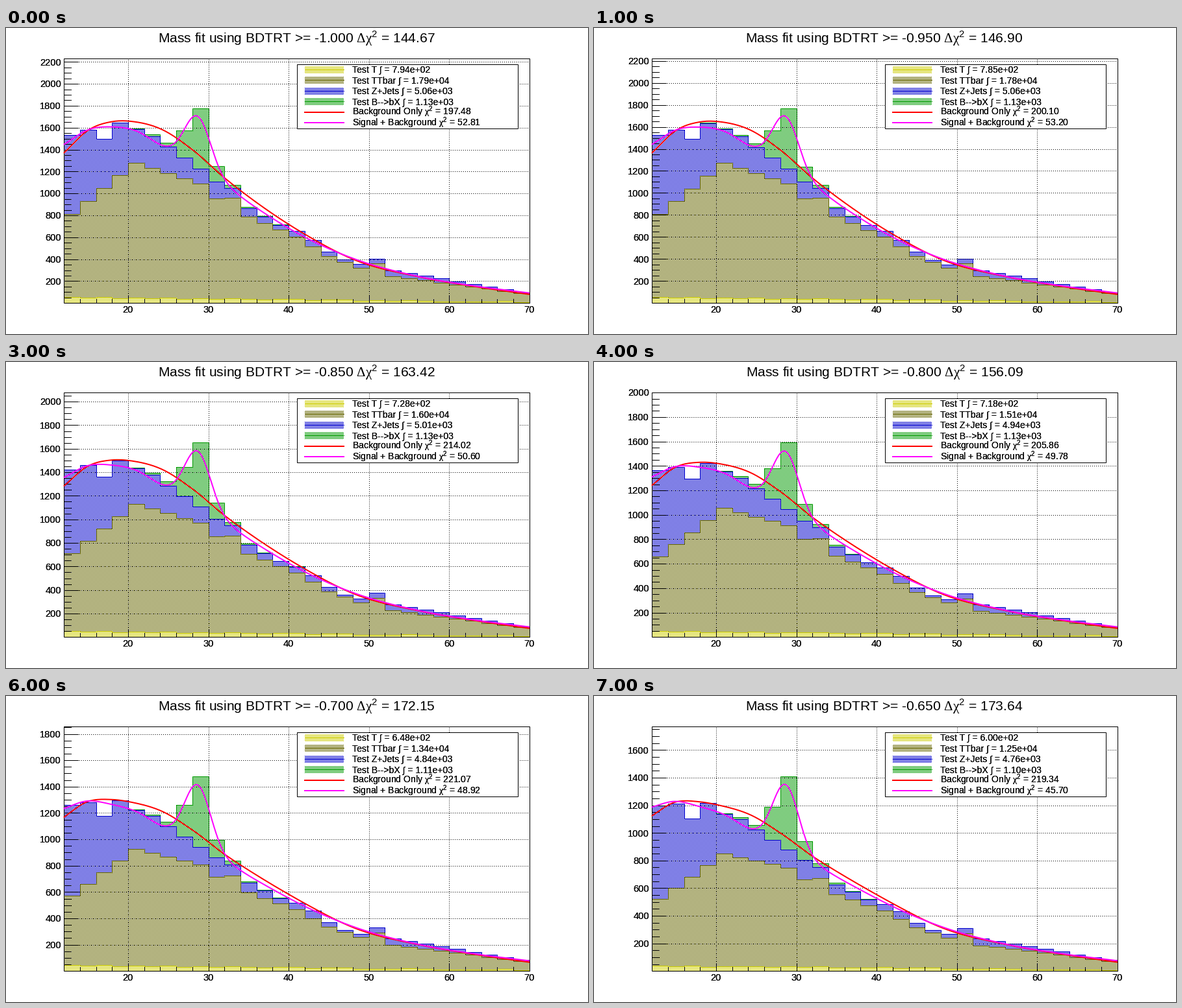
Recreate the animation shown at these times as a matplotlib script. Size 896 by 472 pixels, loop 8000 ms.

```python
import numpy as np
import matplotlib.pyplot as plt
from matplotlib.animation import FuncAnimation
from matplotlib.patches import Rectangle

W, H, DPI = 896, 472, 100
PX = 72 / DPI
LEFT, RIGHT, TOP, BASE = 0.1 * W, 0.9 * W, 0.1 * H, 0.9 * H
M_MIN, M_MAX, BIN = 12, 70, 2

plt.rcParams.update({
    "font.family": "Liberation Sans",
    "mathtext.fontset": "custom",
    "mathtext.rm": "Liberation Sans",
    "mathtext.cal": "Liberation Serif",
})
CHI2 = r"$\mathcal{\chi}^2$"
DELTA_CHI2 = r"$\mathcal{\Delta\chi}^2$"

RED, MAGENTA = (255, 0, 255)[:1] + (0, 0), (255, 0, 255)
GREEN, BLUE, OLIVE, YELLOW = (0, 153, 0), (0, 0, 204), (102, 102, 0), (204, 204, 0)

# Yields and fit quality, one entry per cut
CUTS = np.linspace(-1, -0.65, 8)
N_T = [794, 785, 756, 728, 718, 692, 648, 600]
N_TT = [17900, 17780, 17200, 16000, 15060, 14440, 13450, 12480]
N_Z = [5060, 5060, 5050, 5010, 4940, 4920, 4840, 4760]
N_SIG = [1130, 1130, 1130, 1130, 1130, 1120, 1110, 1100]
CHI_BG = [197.48, 200.10, 207.844, 214.02, 205.864, 221.954, 221.07, 219.34]
CHI_SB = [52.81, 53.20, 53.476, 50.60, 49.776, 51.606, 48.92, 45.70]

# Key points of the loosest cut: (bin, events) and (mass, events)
TT_KEYS = [(0, 814), (4, 1281), (8, 1092), (9, 956), (10, 962), (11, 790),
           (14, 607), (16, 430), (18, 324), (19, 365), (20, 247), (23, 188), (28, 90)]
Z_KEYS = [(0, 721), (1, 650), (2, 449), (3, 479), (4, 307), (5, 290), (8, 136),
          (9, 154), (10, 89), (13, 45), (15, 59), (17, 18), (20, 53), (28, 8)]
BG_KEYS = [(12, 1375), (15, 1580), (18, 1658), (21, 1654), (24, 1592), (28, 1400),
           (32, 1143), (36, 918), (42, 630), (48, 402), (56, 245), (63, 155), (70, 82)]
SB_KEYS = [(12, 1451), (15, 1584), (18, 1610), (21, 1572), (24, 1440), (28, 1276),
           (32, 1078), (36, 869), (42, 603), (48, 410), (56, 248), (63, 160), (70, 95)]
# Share of the fitted background kept by the tightest cut
KEPT_KEYS = [(12, 0.82), (18, 0.74), (26, 0.714), (42, 0.778), (70, 0.81)]

BINS = np.arange((M_MAX - M_MIN) // BIN)
CENTERS = M_MIN + BIN * (BINS + 0.5)
MASS = np.linspace(M_MIN, M_MAX - 0.1, 240)
TT_SHAPE = np.interp(BINS, *zip(*TT_KEYS))
Z_SHAPE = np.interp(BINS, *zip(*Z_KEYS))
T_SHAPE = 42 * np.exp(-(BINS / 19) ** 2) + np.random.default_rng(4).uniform(0, 12, BINS.size)


def gauss(x, mean, sigma):
    return np.exp(-((x - mean) / sigma) ** 2 / 2)


SIG_SHAPE = 514 * gauss(CENTERS, 28.7, 1.26) + 45 * gauss(CENTERS, 29, 4)

YY, XX = np.mgrid[0:H, 0:W]
CHECK = (XX + YY) % 2 == 0

fig = plt.figure(figsize=(W / DPI, H / DPI), dpi=DPI, facecolor="white")
ax = fig.add_axes([0, 0, 1, 1])


def spline(keys, x):
    """Smooth cubic through the key points."""
    xs, ys = np.array(keys, float).T
    slope = np.gradient(ys, xs)
    i = np.clip(np.searchsorted(xs, x) - 1, 0, len(xs) - 2)
    h = xs[i + 1] - xs[i]
    t = (x - xs[i]) / h
    return (ys[i] * (1 + 2 * t) * (1 - t) ** 2 + h * slope[i] * t * (1 - t) ** 2
            + ys[i + 1] * t ** 2 * (3 - 2 * t) + h * slope[i + 1] * t ** 2 * (t - 1))


def to_x(mass):
    return LEFT + (mass - M_MIN) * (RIGHT - LEFT) / (M_MAX - M_MIN)


def to_y(events, y_max):
    return BASE - events * (BASE - TOP) / y_max


def loss(k):
    return (N_TT[0] - N_TT[k]) / (N_TT[0] - N_TT[-1])


def stack(k):
    """Cumulative bin contents, from the lowest layer up."""
    kept = 1 - loss(k) * (0.36 - 0.16 * BINS / BINS[-1])
    t = T_SHAPE * N_T[k] / N_T[0]
    tt = TT_SHAPE * kept
    z = tt + Z_SHAPE * N_Z[k] / N_Z[0]
    return t, tt, z, z + SIG_SHAPE * N_SIG[k] / N_SIG[0]


def tint(rgb):
    return tuple(c / 255 for c in rgb)


def text(x, y, s, size, ha="left", passes=2):
    for _ in range(passes):
        ax.text(x, y + 0.33 * size, s, size=size * PX, ha=ha, va="baseline", zorder=6)


def line(xs, ys, rgb=(0, 0, 0), width=1, z=3, **kw):
    ax.plot(xs, ys, color=tint(rgb), lw=width * PX, zorder=z, **kw)


def ruler(x0, y0, x1, y1, **kw):
    """Straight line on whole pixels."""
    line(np.floor([x0, x1]), np.floor([y0, y1]), **kw)


def box(x0, y0, x1, y1, fill, z):
    x0, y0, x1, y1 = np.floor([x0, y0, x1, y1])
    ax.add_patch(Rectangle((x0, y0), x1 - x0, y1 - y0, fc=fill, ec="black",
                           lw=PX, zorder=z))


def picture(rgb, extent, z):
    ax.imshow(rgb, extent=extent, interpolation="nearest", aspect="auto", zorder=z)


def stipple(rgb):
    return np.where(CHECK[..., None], rgb, 255).astype(np.uint8)


def draw_hists(layers, y_max):
    canvas = np.full((H, W, 3), 255, np.uint8)
    edges = np.floor(to_x(M_MIN + BIN * np.arange(BINS.size + 1)))
    col = np.clip(np.searchsorted(edges, XX[0], side="right") - 1, 0, BINS[-1])
    inside = (XX > edges[0]) & (XX < edges[-1]) & (YY < BASE - 1)
    for events, rgb in zip(layers[::-1], (GREEN, BLUE, OLIVE, YELLOW)):
        tops = np.floor(to_y(events, y_max))
        area = inside & (YY >= tops[col])
        canvas = np.where(area[..., None], stipple(rgb), canvas)
        ax.stairs(tops, edges, baseline=None, color=tint(rgb), lw=PX, zorder=1)
    picture(canvas, (0, W, H, 0), 0)


def draw_axes(y_max):
    dots = dict(linestyle=(0.5, (1, 2)), dash_capstyle="butt", z=1.5)
    for m in range(M_MIN + 2, M_MAX + 1, 2):
        x = to_x(m)
        major = m % 10 == 0
        ruler(x, BASE, x, BASE - (11 if major else 6))
        if major:
            text(x - 0.8, 434.5, str(m), 14.6, "center")
            if m < M_MAX:
                ruler(x, BASE, x, TOP, **dots)
    for v in range(50, int(y_max), 50):
        y = to_y(v, y_max)
        major = v % 200 == 0
        ruler(LEFT, y, LEFT + (22 if major else 11), y)
        if major:
            ruler(LEFT, y, RIGHT, y, **dots)
            text(85, y, str(v), 14.6, "right")
    box(LEFT, TOP, RIGHT, BASE, "none", 3)


def draw_fits(k, y_max):
    kept = 1 - loss(k) * (1 - spline(KEPT_KEYS, MASS))
    background = spline(BG_KEYS, MASS) * kept
    combined = spline(SB_KEYS, MASS) * kept + 460 * gauss(MASS, 28.65, 1.62)
    for events, rgb in ((background, RED), (combined, MAGENTA)):
        line(to_x(MASS), to_y(events, y_max), rgb, 2, 4)


def draw_legend(k):
    box(448, 56, 788, 155, "white", 4.5)
    rows = [
        (f"Test T ∫ = {N_T[k]:.2e}", YELLOW, True),
        (f"Test TTbar ∫ = {N_TT[k]:.2e}", OLIVE, True),
        (f"Test Z+Jets ∫ = {N_Z[k]:.2e}", BLUE, True),
        (f"Test B-->bX ∫ = {N_SIG[k]:.2e}", GREEN, True),
        (f"Background Only {CHI2} = {CHI_BG[k]:.2f}", RED, False),
        (f"Signal + Background {CHI2} = {CHI_SB[k]:.2f}", MAGENTA, False),
    ]
    for i, (label, rgb, filled) in enumerate(rows):
        y = 64 + 16.5 * i
        if filled:
            top = int(y - 5)
            picture(stipple(rgb)[top:top + 11, 460:520], (460, 520, top + 11, top), 5)
        ruler(460, y, 520, y, rgb=rgb, width=1 if filled else 2, z=5.5)
        text(533, y - 0.5, label, 14)


def draw(k):
    ax.cla()
    ax.axis("off")
    layers = stack(k)
    y_max = 1.2595 * layers[-1].max()
    draw_hists(layers, y_max)
    draw_axes(y_max)
    draw_fits(k, y_max)
    draw_legend(k)
    gain = CHI_BG[k] - CHI_SB[k]
    text(447, 16, f"Mass fit using BDTRT >= {CUTS[k]:.3f} {DELTA_CHI2} = {gain:.2f}",
         21, "center", passes=1)
    ax.set_xlim(0, W)
    ax.set_ylim(H, 0)
    return []


anim = FuncAnimation(fig, draw, frames=len(CUTS), init_func=lambda: [],
                     interval=1000, repeat=True, repeat_delay=0)
plt.show()
```
